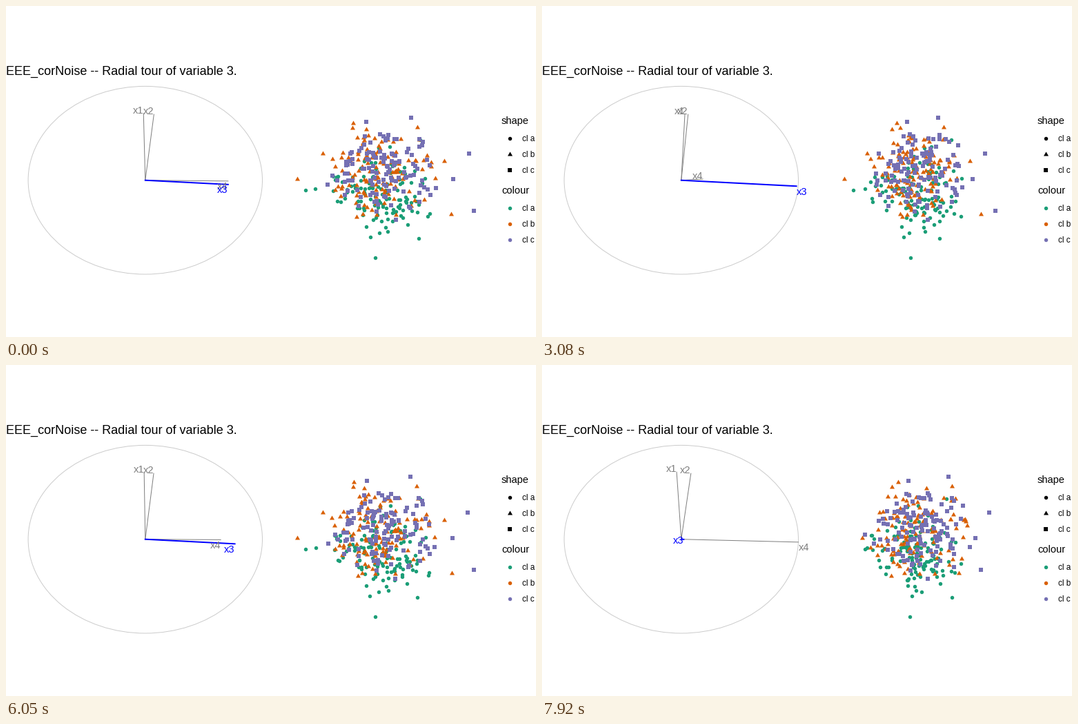
These frames come from a looping animation (768 px wide and 480 px high, 8000 ms). A matplotlib script:

```python
import numpy as np
import matplotlib.pyplot as plt
from matplotlib.animation import FuncAnimation
from matplotlib.patches import Ellipse

plt.rcParams["font.family"] = "Liberation Sans"

W, H, DPI = 768, 480, 96
LOOP, TICK = 8000, 20
OX, OY = 201.8, 252.7        # centre of the axes circle
RX, RY = 169.7, 136.3
MID_X = 355                  # labels flip side past this line
STEP = 0.05                  # tour step in radians
GREY, BLUE = "#7F7F7F", "#0000FF"
COLOURS = ["#1B9E77", "#D95F02", "#7570B3"]
TRIANGLE = [(0, 1.55), (1.34, -0.775), (-1.34, -0.775)]
SHAPES = [("o", 4.1), (TRIANGLE, 6.1), ("s", 4.4)]


def cluster(rng, mean, sd_y, extremes, n=120):
    """Points as (x at angle 0, x at angle 90, y)."""
    z = rng.normal(size=(2 * n, 3))
    z = z[(z ** 2).sum(axis=1) < 6.5][:n]
    x0 = 32 * z[:, 0]
    x90 = 30 * (0.4 * z[:, 0] + 0.92 * z[:, 1])
    core = np.column_stack([x0, x90, sd_y * z[:, 2]]) + mean
    return np.vstack([core, extremes])


rng = np.random.default_rng(12)
clusters = [
    cluster(rng, (540, 541, 273), 29,
            [(470, 463, 266), (533, 534, 364), (593, 566, 336), (585, 588, 193)]),
    cluster(rng, (538, 537, 241), 31,
            [(466, 451, 250), (610, 610, 224), (602, 626, 301), (594, 575, 175)]),
    cluster(rng, (549, 547, 238), 31,
            [(646, 626, 213), (634, 641, 296), (627, 610, 250), (589, 569, 161)]),
]


def angle(t):
    """Tour angle: up to 90 degrees, then back down to 0."""
    if t < 4400:
        n = max(0, (t - 440) // 220)
        return min(np.pi / 4 + STEP * n, np.pi / 2)
    n = 1 + (t - 4400) // 220 if t < 4840 else 3 + (t - 4840) // 110
    return np.pi / 2 - STEP * n


def axis_ends(c, s):
    """Offsets of x1, x2, x4, x3 from the circle's centre."""
    return [(8.4 - 15.1 * c - 0.4 * s, -95.5 - 2 * c),
            (9 + 5 * c, -95.5),
            (RX * c, 4.2 * c - 2.6 * s),
            (RX * s, 8.7 * s)]


def project(points, c, s):
    x0, x90, y = points.T
    mid = 546 - 0.14 * (y - 252)
    return mid + (x0 - mid) * c + (x90 - mid) * s, y + 0.5


fig = plt.figure(figsize=(W / DPI, H / DPI), dpi=DPI, facecolor="white")
ax = fig.add_axes([0, 0, 1, 1])
ax.set(xlim=(0, W), ylim=(H, 0))
ax.axis("off")


def text(x, y, s, size, color="black", **kw):
    return ax.text(x, y, s, fontsize=size, color=color, va="baseline", **kw)


def dots(x, y, shape, color):
    marker, size = shape
    return ax.plot(x, y, ls="", marker=marker, ms=size, mfc=color, mew=0,
                   zorder=2)[0]


text(0, 100, "EEE_corNoise -- Radial tour of variable 3.", 13.5)
ax.add_patch(Ellipse((OX, OY), 2 * RX, 2 * RY, fill=False, ec="#CCCCCC",
                     lw=0.75))

# Legends
text(718, 171, "shape", 11)
text(718, 272, "colour", 11)
for i, name in enumerate(["cl a", "cl b", "cl c"]):
    for top, shape, color in [(191, SHAPES[i], "black"),
                              (292, SHAPES[0], COLOURS[i])]:
        y = top + 23 * i
        dots([729.5], [y + 0.5], shape, color)
        text(748.5, y + 5, name, 8.8)

names = ["x1", "x2", "x4", "x3"]
inks = [GREY, GREY, GREY, BLUE]
spokes = [ax.plot([], [], color=k, lw=1.5 if k == BLUE else 0.75,
                  zorder=3)[0] for k in inks]
labels = [text(0, 0, n, 11, k, zorder=4) for n, k in zip(names, inks)]
clouds = [dots([], [], sh, k) for sh, k in zip(SHAPES, COLOURS)]


def draw(i):
    a = angle(i * TICK + TICK // 2)
    c, s = np.cos(a), np.sin(a)
    for (dx, dy), spoke, label in zip(axis_ends(c, s), spokes, labels):
        x, y = OX + dx, OY + dy
        spoke.set_data([OX, x], [OY, y])
        # Labels are justified away from the middle of the plot
        drop = 6 if abs(dy) < 0.3 else 12.5 if dy > 0 else 0
        label.set_position((x, y + drop))
        label.set_ha("right" if x < MID_X else "left")
    for cloud, points in zip(clouds, clusters):
        cloud.set_data(*project(points, c, s))
    return spokes + labels + clouds


anim = FuncAnimation(fig, draw, frames=LOOP // TICK, interval=TICK,
                     repeat=True, repeat_delay=0)
plt.show()
```
